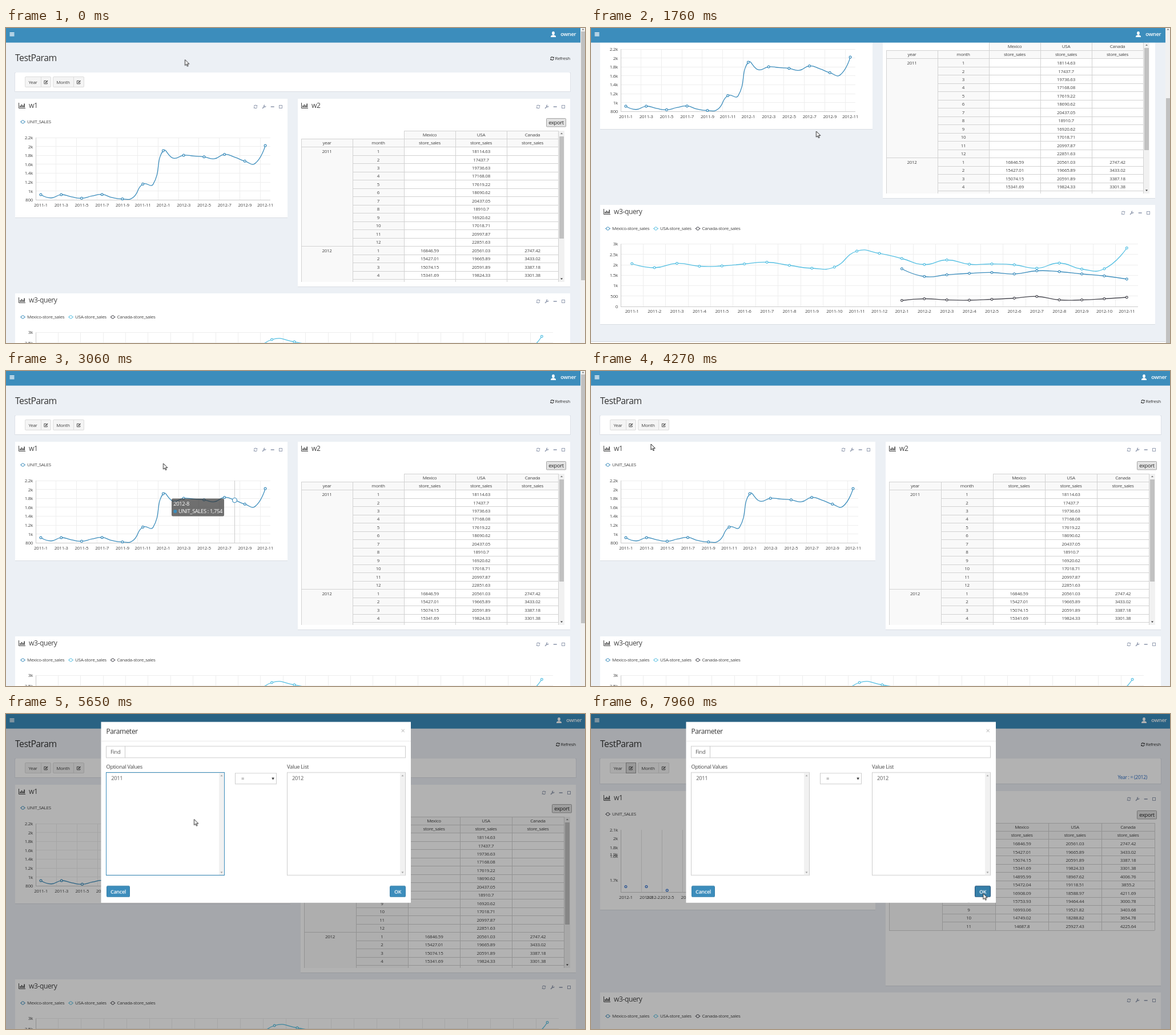
These frames come from a looping animation (1014x552 px, 8 s). An HTML page:

```html
<!DOCTYPE html>
<html lang="en">
<head>
<meta charset="utf-8">
<title>Dashboard</title>
<style>
html, body { margin: 0; height: 100%; overflow: hidden; background: #ecf0f5; }
svg text { font-family: "Open Sans", "Noto Sans", sans-serif; letter-spacing: -.035em; white-space: pre; }
#stage { display: block; width: 100vw; height: 100vh; }
.anim { animation: 8s step-end infinite; }

#scroll { animation-name: scroll; }
@keyframes scroll {
  0% { transform: translateY(0); }
  14.375% { transform: translateY(-18.5px); }
  18% { transform: translateY(-85px); }
  22% { transform: translateY(-155px); }
  25% { transform: translateY(-160px); }
  34.125% { transform: translateY(-32px); }
  38.25% { transform: translateY(0); }
}
#thumb { animation-name: thumb; }
@keyframes thumb {
  0% { transform: translateY(0); }
  14.375% { transform: translateY(14px); }
  18% { transform: translateY(64px); }
  22% { transform: translateY(117px); }
  25% { transform: translateY(121px); }
  34.125% { transform: translateY(24px); }
  38.25% { transform: translateY(0); }
}
.canada { animation-name: canada; }
@keyframes canada {
  0% { color: #4a4a52; }
  30.75% { color: #f56954; }
  34.125% { color: #4a4a52; }
}
#tip { animation-name: tip; }
@keyframes tip { 0% { opacity: 0; } 38.25% { opacity: 1; } 41.625% { opacity: 0; } }
#hover { animation-name: hover; }
@keyframes hover { 0% { opacity: 0; } 47% { opacity: 1; } 53.375% { opacity: 0; } }
#wide { animation-name: wide; }
@keyframes wide { 0% { opacity: 0; } 53.375% { opacity: 1; } }
#filtered { animation-name: filtered; }
@keyframes filtered { 0% { opacity: 0; } 99.5% { opacity: 1; } }
#dialog { animation-name: dialog; }
@keyframes dialog { 0% { opacity: 0; } 56.75% { opacity: 1; } }
#box { animation-name: settle; }
@keyframes settle { 0% { transform: translateY(-.7px); } 60.75% { transform: translateY(0); } }
#before { animation-name: before; }
@keyframes before { 0% { opacity: 1; } 67.375% { opacity: 0; } }
#after { animation-name: after; }
@keyframes after { 0% { opacity: 0; } 67.375% { opacity: 1; } }
#focus { animation-name: focus; }
@keyframes focus { 0% { opacity: 0; } 67.375% { opacity: 1; } 99.5% { opacity: 0; } }
#ok { animation-name: ok; }
@keyframes ok {
  0% { fill: #3c8dbc; stroke: #367fa9; }
  80.875% { fill: #367fa9; stroke: #367fa9; }
  84.375% { fill: #204d74; stroke: #163a58; }
  99.5% { fill: #367fa9; stroke: #204d74; }
}
#arrow { animation-name: arrow; }
@keyframes arrow {
  0% { transform: translate(313.5px, 55.5px); opacity: 1; }
  3.125% { transform: translate(384px, 145px); }
  7.875% { transform: translate(394.5px, 181px); }
  38.25% { transform: translate(275.5px, 162px); }
  41.625% { transform: translate(172px, 118px); }
  44.375% { transform: translate(104px, 101px); opacity: 1; }
  47% { transform: translate(104px, 101px); opacity: 0; }
  53.375% { transform: translate(105px, 128px); opacity: 1; }
  56.75% { transform: translate(142px, 164.5px); }
  60.75% { transform: translate(166px, 147px); }
  64% { transform: translate(195px, 120px); }
  70.625% { transform: translate(329.5px, 184.5px); }
  74.125% { transform: translate(520px, 258px); opacity: 1; }
  76% { transform: translate(520px, 258px); opacity: 0; }
  90.125% { transform: translate(687.3px, 313.5px); opacity: 1; }
  95.625% { transform: translate(687.3px, 324px); }
  99.5% { transform: translate(686.8px, 314.5px); opacity: 1; }
}
#hand { animation-name: hand; }
@keyframes hand {
  0% { transform: translate(66px, 92px); opacity: 0; }
  47% { transform: translate(66px, 92px); opacity: 1; }
  53.375% { transform: translate(66px, 92px); opacity: 0; }
  76% { transform: translate(685px, 315px); opacity: 1; }
  84.375% { transform: translate(685px, 313px); opacity: 1; }
  90.125% { transform: translate(685px, 313px); opacity: 0; }
}
</style>
</head>
<body>
<svg id="stage" viewBox="0 0 1014 552" preserveAspectRatio="none"></svg>
<script>
const BLUE = '#3c8dbc', CYAN = '#54bfe2', GREY = '#97a0b3', ROW = 14.48;

const unitSales = [921, 848, 921, 872, 840, 890, 925, 855, 825, 850, 1158, 1150,
  1906, 1738, 1803, 1785, 1768, 1725, 1823, 1760, 1672, 1620, 2020];
// heights above the zero line, in pixels
const usaLine = [75, 68, 75.5, 70.5, 71, 74.5, 77.5, 72, 67, 69, 97, 93,
  84, 73.5, 81.5, 74, 74.5, 73, 67, 76, 65.5, 66, 102.5];
const mexicoLine = [66, 52.5, 55.5, 58, 59.5, 57, 62.5, 61, 57, 53.5, 48];
const canadaLine = [10.5, 13.5, 11.5, 11, 12.5, 14.5, 17.5, 11.5, 11.5, 13.5, 16];

const sales2011 = [18114.63, 17437.7, 19736.63, 17168.08, 17619.22, 18690.62,
  20437.05, 18910.7, 16920.62, 17018.71, 20997.87, 22851.63].map(v => ['', v, '']);
const sales2012 = [
  [16846.59, 20561.03, 2747.42], [15427.01, 19665.89, 3433.02], [15074.15, 20591.89, 3387.18],
  [15341.69, 19824.33, 3301.38], [14895.99, 18967.62, 4006.76], [15472.04, 19118.51, 3855.2],
  [16908.09, 18588.97, 4211.69], [15753.93, 19464.44, 3000.78], [16993.06, 19521.82, 3403.68],
  [14749.02, 18288.82, 3654.78], [14687.8, 25927.43, 4225.64]];
const months = Array.from({ length: 23 }, (_, i) => `${2011 + (i / 12 | 0)}-${i % 12 + 1}`);

const text = (x, y, str, size = 8, anchor = 'start', fill = '#444', weight = 400) =>
  `<text x="${x}" y="${y}" dy=".36em" font-size="${size}" text-anchor="${anchor}" fill="${fill}" font-weight="${weight}">${str}</text>`;
const mid = (x, y, str, size, fill, weight) => text(x, y, str, size, 'middle', fill, weight);
const rect = (x, y, w, h, fill, extra = '') =>
  `<rect x="${x}" y="${y}" width="${w}" height="${h}" fill="${fill}" ${extra}/>`;
const frame = (x, y, w, h, fill, stroke, extra = '') =>
  rect(x + .5, y + .5, w - 1, h - 1, fill, `stroke="${stroke}" ${extra}`);
const snap = v => Math.floor(v) + .5;
const hline = (x, y, w, c) => `<path d="M${x} ${snap(y)}h${w}" stroke="${c}"/>`;
const vline = (x, y, h, c) => `<path d="M${snap(x)} ${y}v${h}" stroke="${c}"/>`;
const path = (d, extra) => `<path d="${d}" ${extra}/>`;
const at = (x, y, body) => `<g transform="translate(${x} ${y})">${body}</g>`;
const up = (x, y, c) => path(`M${x - 2} ${y + 1}h4l-2-2.4z`, `fill="${c}"`);
const down = (x, y, c) => path(`M${x - 2} ${y - 1}h4l-2 2.4z`, `fill="${c}"`);

const icons = {
  refresh: c => path('M-2.7-.6A2.8 2.8 0 0 1 2-1.9M2.7.6A2.8 2.8 0 0 1-2 1.9', `fill="none" stroke="${c}" stroke-width="1.1"`)
    + path('M3.2-3.3v2.7H.6zM-3.2 3.3V.6h2.6z', `fill="${c}"`),
  wrench: c => path('M-2.5 2.5L.6-.6', `stroke="${c}" stroke-width="1.7" stroke-linecap="round"`)
    + path('M3-1.2A1.7 1.7 0 1 1 1.2-3', `fill="none" stroke="${c}" stroke-width="1.3"`),
  minus: c => rect(-3, -.8, 6, 1.7, c),
  square: c => rect(-2.5, -2.5, 5, 5, 'none', `stroke="${c}"`),
  bars: c => path('M-5.5-5V4.5H6', `fill="none" stroke="${c}"`)
    + path('M-3 3V0M-.6 3v-5M1.8 3v-3.6M4.2 3v-6.4', `stroke="${c}" stroke-width="1.6"`),
  edit: c => path('M2.3.6v2.2h-5.4v-5.4h3.6', `fill="none" stroke="${c}" stroke-width=".9"`)
    + path('M-1 1.1L2.9-2.8', `stroke="${c}" stroke-width="1.5"`)
};

function card(x, y, w, h) {
  return rect(x, y + 1, w, h, '#d9dde3') + rect(x, y, w, h, '#fff');
}
function panel(x, y, w, h, title) {
  const r = x + w;
  return card(x, y, w, h) + at(x + 12, y + 12, icons.bars('#444')) + text(x + 24, y + 11.5, title, 12.1)
    + ['refresh', 'wrench', 'minus', 'square']
      .map((n, i) => at(r - [56, 41, 26.3, 12][i], y + 14, icons[n](GREY))).join('');
}
function legend(x, y, name, color, cls = '') {
  return `<g class="${cls}" style="color:${color}">` + path(`M${x} ${y}h9`, 'stroke="currentColor"')
    + `<circle cx="${x + 4.5}" cy="${y}" r="2.7" fill="#fff" stroke="currentColor"/></g>` + text(x + 12, y, name);
}
function curve(pts) {
  let d = `M${pts[0]}`, from = pts[0];
  for (let i = 1; i < pts.length; i++) {
    const p = pts[i], a = pts[i - 1], b = pts[i + 1];
    let to = p, out = p;
    if (b) {
      const la = Math.hypot(p[0] - a[0], p[1] - a[1]), lb = Math.hypot(b[0] - p[0], b[1] - p[1]);
      const k = .5 / (la + lb), v = [b[0] - a[0], b[1] - a[1]];
      to = p.map((c, j) => c - v[j] * k * la);
      out = p.map((c, j) => c + v[j] * k * lb);
    }
    d += `C${from} ${to} ${p}`;
    from = out;
  }
  return d;
}
const dot = (x, y, color = 'currentColor') =>
  `<circle cx="${x}" cy="${y}" r="1.9" fill="#fff" stroke="${color}" stroke-width="1.2"/>`;
function series(pts, color, every = 1, cls = '') {
  return `<g class="${cls}" style="color:${color}">` + path(curve(pts), 'fill="none" stroke="currentColor" stroke-width="1.3"')
    + pts.filter((_, i) => i % every === 0).map(p => dot(...p)).join('') + '</g>';
}
function axes(w, top, bottom, labels, every) {
  const step = w / 23, gap = (bottom - top) / (labels.length - 1);
  let s = '';
  labels.forEach((l, i) => {
    const y = top + gap * i;
    s += hline(52, y, w, '#eee') + text(47, y, l, 8, 'end');
  });
  months.forEach((m, i) => {
    if (i % every) return;
    s += vline(52 + step * i, top, bottom - top, '#eee') + mid(52 + step * (i + .5), bottom + 8.6, m);
  });
  return s + hline(52, bottom, w, '#ccc') + vline(52, top, bottom - top, '#ccc');
}
function salesChart(w) {
  const pts = unitSales.map((v, i) => [52 + w / 23 * (i + .5), 301.5 - (v - 800) * .0782]);
  return axes(w, 192, 301.5, ['2.2k', '2k', '1.8k', '1.6k', '1.4k', '1.2k', '1k', '800'], 2) + series(pts, BLUE, 2);
}
function queryChart(w, cls) {
  const pts = (list, start) => list.map((v, i) => [52 + w / 23 * (i + start + .5), 643 - v]);
  return axes(w, 533.5, 643, ['3k', '2.5k', '2k', '1.5k', '1k', '500', '0'], 1)
    + series(pts(mexicoLine, 12), BLUE) + series(pts(usaLine, 0), CYAN)
    + series(pts(canadaLine, 12), '#4a4a52', 1, cls);
}
// half-updated chart right after the filter is applied
function loadingChart() {
  const ys = [203, 218.5, 234, 246.5, 249, 291], ls = ['2.1k', '2k', '1.8k', '1.9k', '1.6k', '1.7k'];
  return ys.map((y, i) => text(47, y, ls[i], 8, 'end')).join('')
    + [52, 88.5, 124.5, 160.5].map(x => vline(x, 203, 109, '#e2e2e2')).join('')
    + hline(52, 312, 416, '#ccc') + vline(52, 203, 109, '#ccc')
    + [[61, '2012-1'], [97, '2011-3'], [109, '2012-2'], [133.5, '2012-5'], [169.5, '2012-7']]
      .map(([x, l]) => mid(x, 321, l)).join('')
    + [[61, 302.5], [97, 302.5], [133.3, 309]].map(p => dot(...p, '#2f6fd0')).join('');
}
function table(x, y, cw, groups, scrolls) {
  const line = '#d2d2d2', rows = groups.flatMap(g => g.rows), bottom = ROW * (rows.length + 2);
  const cx = k => cw * (k + .5);
  let s = rect(cw * 2, 0, cw * 3, ROW, '#f9f9f9') + rect(0, ROW, cw * 5, ROW, '#f9f9f9')
    + rect(0, ROW * 2, cw * 2, bottom - ROW * 2, '#f9f9f9');
  ['Mexico', 'USA', 'Canada'].forEach((c, i) => {
    s += mid(cx(i + 2), 7, c) + mid(cx(i + 2), ROW + 7, 'store_sales');
  });
  s += mid(cx(0), ROW + 7, 'year') + mid(cx(1), ROW + 7, 'month');
  s += hline(cw * 2, 0, cw * 3, line) + hline(0, ROW, cw * 5, line);
  let top = ROW * 2;
  for (const g of groups) {
    s += hline(0, top, cw * 5, line) + mid(cx(0), top + 7.2, g.year);
    g.rows.forEach((r, i) => {
      s += hline(cw, top, cw * 4, line) + mid(cx(1), top + 7.2, i + 1)
        + r.map((v, k) => mid(cx(k + 2), top + 7.2, v)).join('');
      top += ROW;
    });
  }
  s += hline(0, bottom, cw * 5, line);
  for (let k = 0; k < 6; k++) {
    const y0 = k < 2 ? ROW : 0;
    s += vline(cw * k, y0, bottom - y0, line);
  }
  if (scrolls) {
    const sx = cw * 5 + 1;
    s += rect(sx, 0, 10, 265, '#f1f1f1') + rect(sx + 1, 10, 8, 179, '#c1c1c1')
      + up(sx + 5, 5, '#777') + down(sx + 5, 259.5, '#333');
  }
  return `<svg x="${x}" y="${y}" width="${cw * 5 + 11}" height="265">${s}</svg>`;
}
function param(x, w, split, label, pressed) {
  return frame(x, 85, w, 19, '#f4f4f4', '#ddd', 'rx="1.5"')
    + (pressed ? frame(split, 85, x + w - split, 19, '#dcdcdc', '#999') : vline(split, 85, 19, '#ddd'))
    + mid((x + split) / 2, 95, label) + at((split + x + w) / 2, 95, icons.edit('#444'));
}
function nav(w, x) {
  return rect(0, 0, w, 25.6, BLUE)
    + path('M6.5 8.5h8M6.5 11h8M6.5 13.5h8', 'stroke="#fff" stroke-width="1.3"')
    + `<ellipse cx="${x + 4.5}" cy="9" rx="2.4" ry="2.9" fill="#fff"/>`
    + path(`M${x} 16v-1.4q.3-1.6 3.2-2.4h2.6q2.9.8 3.2 2.4V16z`, 'fill="#fff"')
    + text(x + 17.3, 11, 'owner', 9.4, 'start', '#fff', 600);
}
function page(o) {
  const { right, left2, end1, filtered, cls = '' } = o, dy = filtered ? 11 : 0, y3 = filtered ? 488 : 465;
  let s = text(16, 52, 'TestParam', 15.8, 'start', '#333')
    + at(right - 31.5, 53.5, icons.refresh('#333')) + text(right, 53.5, 'Refresh', 8, 'end', '#333')
    + frame(15, 78, right - 14, 34 + dy, '#fff', '#dde1e8') + card(17, 78, right - 18, 33 + dy)
    + param(33, 46, 61, 'Year', filtered) + param(82, 55, 118, 'Month');
  if (filtered) s += text(974, 111, 'Year : = (2012)', 8.6, 'end', '#2f6fc4');
  s += panel(16, 124 + dy, end1 - 16, 208, 'w1')
    + legend(25, 164.5 + dy, 'UNIT_SALES', filtered ? '#4a4a52' : BLUE)
    + (filtered ? loadingChart() : salesChart(end1 - 30 - 52));
  s += panel(left2, 124 + dy, right - left2, filtered ? 341 : 329, 'w2')
    + frame(right - 42, 158 + dy, 35, 15.5, '#e3e3e3', '#a5a5a5', 'rx="1"')
    + mid(right - 24.5, 165.5 + dy, 'export', 9.3, '#222');
  s += filtered
    ? table(522, 191, 93, [{ year: 2012, rows: sales2012 }])
    : table(left2 + 6, 180, right > 990 ? 91 : 90,
      [{ year: 2011, rows: sales2011 }, { year: 2012, rows: sales2012.slice(0, 5) }], true);
  s += panel(16, y3, right - 16, 209, 'w3-query')
    + legend(25, y3 + 41.5, 'Mexico-store_sales', BLUE) + legend(109, y3 + 41.5, 'USA-store_sales', CYAN)
    + legend(182.5, y3 + 41.5, 'Canada-store_sales', '#4a4a52', cls);
  if (!filtered) s += queryChart(right - 30 - 52, cls);
  return s;
}
function tooltip() {
  return vline(400, 192, 110, '#ccc')
    + `<circle cx="400.5" cy="226.5" r="4" fill="#fff" stroke="${BLUE}" stroke-width="1.2"/>`
    + rect(290, 223.5, 92, 31, 'rgba(50,50,50,.7)', 'rx="2.5"')
    + text(293.3, 233, '2012-8', 9.33, 'start', '#fff') + `<circle cx="296.3" cy="246" r="3" fill="${BLUE}"/>`
    + text(302, 245.5, 'UNIT_SALES : 1,754', 9.33, 'start', '#fff');
}
function listBox(x) {
  return frame(x, 102, 208, 181, '#fff', '#ccc') + rect(x + 198, 103, 9, 179, '#f1f1f1')
    + up(x + 202.5, 108, '#999') + down(x + 202.5, 277.5, '#999');
}
function modal() {
  const S = 9.33, option = (x, y, v) => text(x, y, v, S, 'start', '#555');
  return rect(166.5, 13.8, 542.5, 317, '#fff')
    + text(175.5, 30.3, 'Parameter', 12, 'start', '#333') + mid(695, 29, '×', 13, '#bbb')
    + hline(166.5, 47, 542.5, '#e8e8e8')
    + frame(175, 56, 525, 21, '#fff', '#ccc') + vline(208, 56, 21, '#ccc') + text(183, 66.8, 'Find', S, 'start', '#555')
    + text(175.5, 92, 'Optional Values', S) + text(492, 92, 'Value List', S)
    + listBox(175) + listBox(492) + option(184.3, 112.7, '2011')
    + `<g id="before" class="anim">${option(184.3, 124.7, '2012')}</g>`
    + `<g id="after" class="anim">${option(501, 112.7, '2012')}</g>`
    + `<g id="focus" class="anim">${frame(175, 102, 208, 181, 'none', BLUE)}</g>`
    + frame(401, 103, 73, 20, '#fff', '#ccc') + option(412, 113.5, '=') + path('M465.3 111.5h4.6l-2.3 4z', 'fill="#333"')
    + frame(176, 301, 41, 20, BLUE, '#367fa9', 'rx="1.5"') + mid(196.5, 311.3, 'Cancel', 9, '#fff', 600)
    + frame(672, 301, 28, 20, BLUE, '#367fa9', 'rx="1.5" id="ok" class="anim"') + mid(686, 311.3, 'OK', 9, '#fff', 600);
}
function pointers() {
  const arrow = path('M0 0V10.2L2.4 8L4 11.7L5.6 11L4 7.4H7.3Z', 'fill="#fff" stroke="#111" stroke-width=".9"');
  const hand = path('M2.4 6.6V1.4a1 1 0 0 1 2 0V4.6L8.4 5.4Q9.5 5.8 9.3 7L8.7 10.2L8 11.6V12.6H3.6V11.6L.8 8.2Q0 6.8 1.2 6.4Z',
    'fill="#fff" stroke="#111" stroke-width=".9"');
  return `<g id="arrow" class="anim">${arrow}</g><g id="hand" class="anim">${hand}</g>`;
}

const wide = { right: 998, left2: 516, end1: 498 };
const ground = rect(0, 0, 1014, 552, '#ecf0f5');
document.getElementById('stage').innerHTML = ground
  + '<g id="scroll" class="anim">' + page({ right: 988, left2: 511, end1: 493, cls: 'anim canada' })
  + rect(0, 705, 1006, 60, '#fff') + hline(0, 704.5, 1006, '#d2d6de')
  + `<g id="hover" class="anim">${frame(61, 85, 18, 19, '#e2e2e2', '#c4c4c4') + at(70, 95, icons.edit('#333'))}</g>`
  + `<g id="tip" class="anim">${tooltip()}</g></g>`
  + nav(1006, 954) + rect(1006, 0, 8, 552, '#f1f1f1') + up(1010.5, 2.5, '#777')
  + rect(1007, 6, 7, 436, '#c1c1c1', 'id="thumb" class="anim"')
  + `<g id="wide" class="anim">${ground + page(wide) + nav(1014, 964)}</g>`
  + `<g id="filtered" class="anim">${ground + page({ ...wide, filtered: true }) + nav(1014, 964)}</g>`
  + `<g id="dialog" class="anim">${rect(0, 0, 1014, 552, 'rgba(0,0,0,.3)')}<g id="box" class="anim">${modal()}</g></g>`
  + pointers();
</script>
</body>
</html>
```
